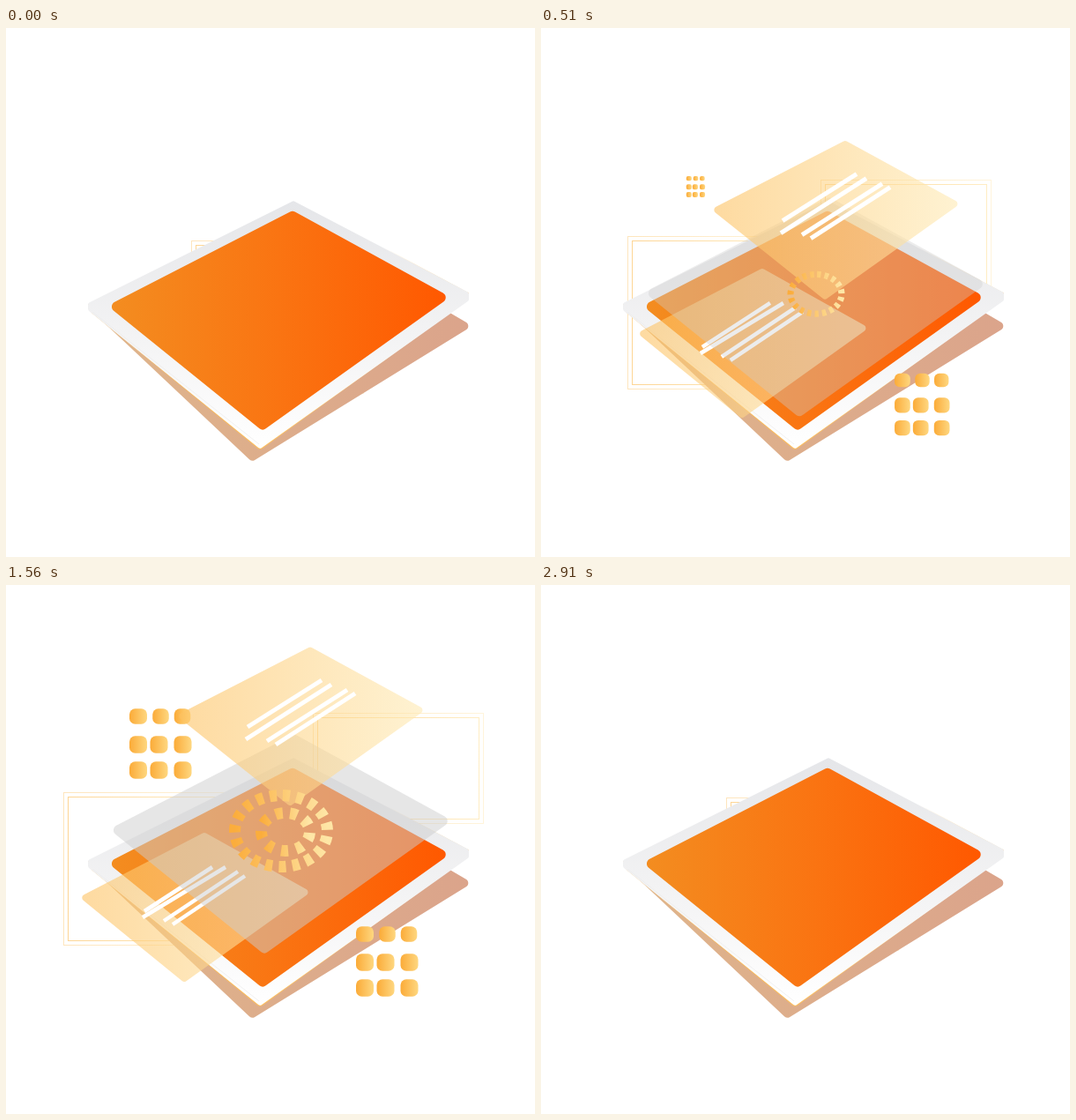
These frames come from a looping animation (600x600 px, 4.5 s). An HTML page with a canvas:

```html
<!DOCTYPE html>
<html lang="en">
<head>
<meta charset="utf-8">
<title>Layered tablet</title>
<style>
html, body { margin: 0; width: 100%; height: 100%; overflow: hidden; background: #fff; }
canvas { display: block; width: 600px; height: 600px; }
</style>
</head>
<body>
<canvas id="stage" width="600" height="600"></canvas>
<script>
const ctx = document.getElementById('stage').getContext('2d');
const LOOP = 4500, OUT_START = 2310, OUT_LENGTH = 600;

// Entrance progress of each part at the key times.
const TIMES = [0, 240, 510, 720, 1080, 1560];
const TRACKS = {
  frames: [0, .248, .772, .938, 1, 1],
  slide: [0, .25, .74, .91, 1, 1],
  lift: [0, .18, .65, .836, .97, 1],
  rise: [0, .08, .4, .74, .94, 1],
  fade: [0, .45, 1, 1, 1, 1],
  glass: [0, 0, .75, 1, 1, 1],
  ring: [0, 0, .55, .875, 1, 1],
  core: [0, 0, 0, .17, .885, 1],
  dotsLow: [0, .38, .885, .995, 1, 1],
  dotsHigh: [0, 0, .3, .79, 1, 1]
};
// Exit easing exponent: larger values leave later.
const EXIT = { fade: 1, glass: 1, ring: 18, core: 18, dotsLow: 18, dotsHigh: 18 };

// Smooth monotone curve through the key values.
function curve(v, t) {
  const last = TIMES.length - 1;
  if (t >= TIMES[last]) return v[last];
  const slope = i => (v[i + 1] - v[i]) / (TIMES[i + 1] - TIMES[i]);
  const tangent = i => {
    if (i === 0 || i === last) return 0;
    const a = slope(i - 1), b = slope(i);
    return a * b > 0 ? 2 * a * b / (a + b) : 0;
  };
  let i = 0;
  while (t >= TIMES[i + 1]) i++;
  const h = TIMES[i + 1] - TIMES[i], u = (t - TIMES[i]) / h, w = 1 - u;
  return v[i] * w * w * (1 + 2 * u) + v[i + 1] * u * u * (3 - 2 * u)
    + h * u * w * (tangent(i) * w - tangent(i + 1) * u);
}

function progress(name, t) {
  const out = Math.min(1, Math.max(0, (t - OUT_START) / OUT_LENGTH));
  return curve(TRACKS[name], t) * (1 - out ** (EXIT[name] || 5));
}

function gradient(x0, y0, x1, y1, ...colors) {
  const g = ctx.createLinearGradient(x0, y0, x1, y1);
  colors.forEach((c, i) => g.addColorStop(i / (colors.length - 1), c));
  return g;
}

function shape(points, radius, fill) {
  const n = points.length, [ax, ay] = points[0], [bx, by] = points[n - 1];
  ctx.beginPath();
  ctx.moveTo((ax + bx) / 2, (ay + by) / 2);
  points.forEach((p, i) => ctx.arcTo(...p, ...points[(i + 1) % n], radius));
  ctx.closePath();
  ctx.fillStyle = fill;
  ctx.fill();
}

function line(x0, y0, x1, y1, width, color) {
  ctx.beginPath();
  ctx.moveTo(x0, y0);
  ctx.lineTo(x1, y1);
  ctx.lineWidth = width;
  ctx.strokeStyle = color;
  ctx.stroke();
}

function at(x, y, scale, alpha, draw) {
  if (scale < .005 || alpha <= 0) return;
  ctx.save();
  ctx.translate(x, y);
  ctx.scale(scale, scale);
  ctx.globalAlpha = alpha;
  draw();
  ctx.restore();
}

function doubleFrame(x, y, w, h) {
  x = Math.round(x) + .5;
  y = Math.round(y) + .5;
  ctx.lineWidth = 1;
  for (const [inset, alpha] of [[0, .4], [5, .65]]) {
    ctx.strokeStyle = gradient(x, 0, x + w, 0, `rgba(252,190,90,${alpha})`, `rgba(255,228,165,${alpha})`);
    ctx.strokeRect(x + inset, y + inset, w - 2 * inset, h - 2 * inset);
  }
}

function dots() {
  for (const y of [-31, 1, 30]) {
    const top = y === -31, xs = top ? [-25.5, 0, 24.5] : [-25.5, -2, 25];
    xs.forEach((x, i) => {
      const w = top && i ? 18.5 : 20, h = top ? 17.5 : 19.5;
      ctx.beginPath();
      ctx.roundRect(x - w / 2, y - h / 2, w, h, 6.5);
      ctx.fillStyle = gradient(x - w / 2, 0, x + w / 2, 0, '#fbab38', '#fed780');
      ctx.fill();
    });
  }
}

function dashedRing(rx, ry, count, start) {
  const h = ((rx - ry) / (rx + ry)) ** 2;
  const step = Math.PI * (rx + ry) * (1 + 3 * h / (10 + Math.sqrt(4 - 3 * h))) / count;
  ctx.beginPath();
  ctx.ellipse(0, 0, rx, ry, 0, -Math.PI / 2, Math.PI * 1.5);
  ctx.setLineDash([8.2, step - 8.2]);
  ctx.lineDashOffset = -start;
  ctx.lineWidth = 13;
  ctx.strokeStyle = gradient(-rx, 0, rx, 0, '#fbad3c', '#fee6a6');
  ctx.stroke();
}

const SCREEN = [[115, 315], [325, 207], [504, 305], [291, 457]];
const TOP_CARD = {
  corners: [[193, 78], [345, 0], [476, 71.5], [322, 181]],
  lines: [[274, 91, 358, 38], [272, 105, 369, 43], [296, 107, 387, 49], [306, 111, 396, 53]],
  width: 5
};
const SIDE_CARD = {
  corners: [[83, 354], [225, 280.5], [346, 348], [202, 451]],
  lines: [[157, 370, 234, 320], [155, 377, 249, 320], [179, 381, 263, 325], [189, 385, 271, 330]],
  width: 4.5
};

function card({ corners, lines, width }) {
  const tint = gradient(corners[0][0], 0, corners[2][0], 0, 'rgba(253,193,96,.6)', 'rgba(254,234,180,.6)');
  shape(corners, 4, tint);
  lines.forEach(l => line(...l, width, '#fff'));
}

function tablet() {
  shape([[96, 320], [279, 492], [529, 338], [495, 318]], 5, gradient(100, 0, 525, 0, '#dfb58b', '#dba48b'));
  line(93, 314, 200, 262, 1, gradient(93, 0, 200, 0, '#fcc570', 'rgba(252,197,112,0)'));
  line(430, 250, 525, 301, 1, gradient(430, 0, 525, 0, 'rgba(252,197,112,0)', '#fcd595'));
  shape([[92, 319], [326, 199], [526, 307], [288, 479]], 5, gradient(93, 0, 525, 0, '#fbb03b', '#fcd08a'));
  shape([[93, 312], [326, 196], [525, 300], [525, 309], [288, 477.5], [93, 320]], 3,
    gradient(0, 197, 0, 477, '#e5e6e9', '#f2f2f3', '#fff'));
  line(98, 322, 287, 472, 1, 'rgba(235,235,236,.7)');
  shape(SCREEN, 6, gradient(117, 0, 502, 0, '#f38d20', '#fa7412', '#ff5800'));
}

function draw(t) {
  const p = {};
  for (const name in TRACKS) p[name] = progress(name, t);
  ctx.clearRect(0, 0, 600, 600);

  doubleFrame(210 - 145 * p.frames, 241 - 6 * p.frames, 195, 173);
  doubleFrame(210 + 138 * p.frames, 266 - 121 * p.frames, 193, 125);
  tablet();
  at(432.5, 427, p.dotsLow, 1, dots);
  at(175.5, 180, p.dotsHigh, 1, dots);

  at(100 * (1 - p.slide), -31 * (1 - p.slide), 1, p.fade, () => card(SIDE_CARD));
  const up = 38 * p.rise;
  at(2, -up, 1, p.glass, () => shape(SCREEN, 6, 'rgba(205,205,205,.5)'));
  at(0, 235 - 165 * p.lift, 1, p.fade, () => card(TOP_CARD));
  at(312, 317 - up, p.ring, 1, () => dashedRing(52.5, 40.5, 19, 1.9));
  at(317, 318 - up, p.core, 1, () => dashedRing(27.5, 21.5, 9, 5.2));
}

function tick() {
  draw(performance.now() % LOOP);
  requestAnimationFrame(tick);
}
tick();
</script>
</body>
</html>
```
